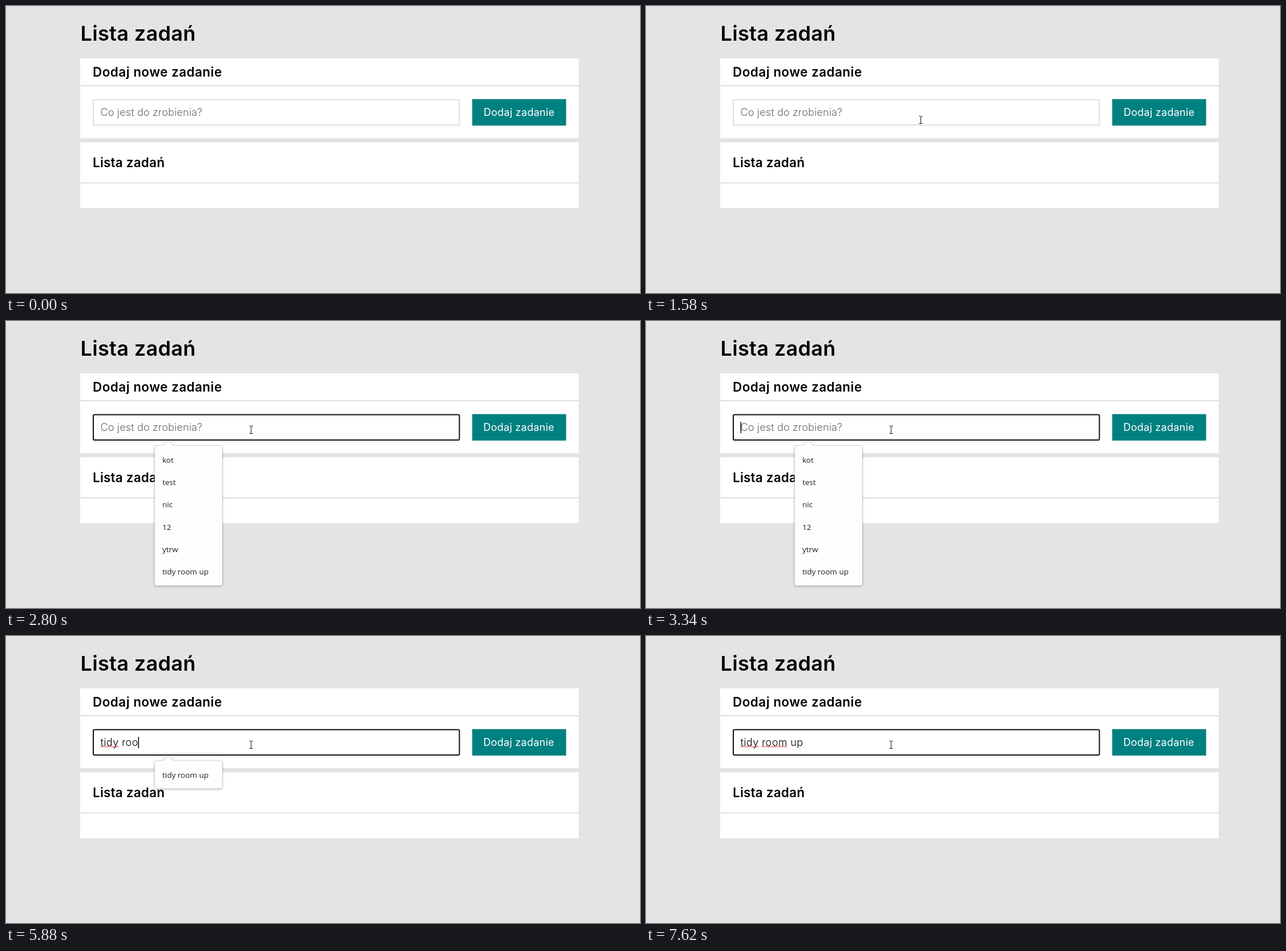
Write an HTML page with a canvas that moves like this. It is 1111 by 504 pixels and loops after 8 s.

```html
<!DOCTYPE html>
<html lang="pl">
<head>
<meta charset="utf-8">
<title>Lista zadań</title>
<style>
  html, body { margin: 0; width: 100%; height: 100%; overflow: hidden; background: #e3e5e4; }
  canvas { display: block; }
</style>
</head>
<body>
<canvas id="stage" width="1111" height="504"></canvas>
<script>
const ctx = document.getElementById('stage').getContext('2d');
const LOOP = 8000;
const SANS = 'Inter, "Open Sans", sans-serif';
const MENU_FONT = '13.5px "Open Sans", "Noto Sans", sans-serif';
const INPUT_FONT = `300 18px ${SANS}`;
const INPUT_SPACING = 0.4;
const FOCUS = 2340;
const TEXT_X = 165.5;

// [time, typed text]
const TYPING = [
  [3410, 't'], [3480, 'ti'], [3950, 'tid'], [4080, 'tidy'], [5090, 'tidy '],
  [5750, 'tidy ro'], [5880, 'tidy roo'], [6080, 'tidy room'],
  [6210, 'tidy room '], [6680, 'tidy room u'], [7080, 'tidy room up']
];
// [time, caret visible]
const CARET = [
  [0, false], [FOCUS, true], [2800, false], [3340, true], [4610, false],
  [5090, true], [5620, false], [5750, true], [7620, false]
];
const SUGGESTIONS = ['kot', 'test', 'nic', '12', 'ytrw', 'tidy room up'];

function latest(list, t, fallback) {
  let value = fallback;
  for (const [time, v] of list) if (t >= time) value = v;
  return value;
}

function box(x, y, w, h, color) {
  ctx.fillStyle = color;
  ctx.fillRect(x, y, w, h);
}

function label(str, x, y, font, color, spacing = 0) {
  ctx.font = font;
  ctx.letterSpacing = spacing + 'px';
  ctx.fillStyle = color;
  ctx.fillText(str, x, y);
}

function inputWidth(str) {
  ctx.font = INPUT_FONT;
  ctx.letterSpacing = INPUT_SPACING + 'px';
  return ctx.measureText(str).width;
}

function drawPage(t) {
  box(0, 0, 1111, 504, '#e3e5e4');
  label('Lista zadań', 130.5, 61, `600 36px ${SANS}`, '#000', 0.35);

  box(130, 92, 873.5, 140, '#fff');
  box(130, 139, 873.5, 2, '#dfdfdf');
  label('Dodaj nowe zadanie', 152, 123.5, `600 22.4px ${SANS}`, '#000', 0.5);

  box(130, 239.5, 873.5, 115.5, '#fff');
  box(130, 309.5, 873.5, 2, '#dfdfdf');
  label('Lista zadań', 152, 283, `600 22.4px ${SANS}`, '#000', 0.25);

  box(817, 163.5, 164.5, 46.5, '#008080');
  label('Dodaj zadanie', t < FOCUS ? 837 : 836.5, 192.5, `400 18px ${SANS}`, '#fff', 0.25);
}

function drawSquiggle(x, width) {
  ctx.beginPath();
  for (let i = 0; i <= width / 2; i++) ctx.lineTo(x + i * 2, i % 2 ? 193 : 195.5);
  ctx.strokeStyle = '#e8303a';
  ctx.lineWidth = 1;
  ctx.stroke();
}

function drawInput(t) {
  const focused = t >= FOCUS;
  ctx.beginPath();
  ctx.roundRect(153, 164.5, 641.5, 44.5, focused ? 2 : 0);
  ctx.strokeStyle = focused ? '#101010' : '#dfdfdf';
  ctx.lineWidth = 2;
  ctx.stroke();

  const typed = latest(TYPING, t, '');
  if (typed) label(typed, TEXT_X, 193, INPUT_FONT, '#000', INPUT_SPACING);
  else label('Co jest do zrobienia?', TEXT_X, 193, INPUT_FONT, '#666', 0.15);

  if (t >= 5160) drawSquiggle(TEXT_X, inputWidth('tidy'));
  if (t >= 6280) drawSquiggle(TEXT_X + inputWidth('tidy '), inputWidth('room'));
  if (latest(CARET, t, false)) {
    box(Math.round(TEXT_X + inputWidth(typed)) - 0.5, 177, 1.5, 20, '#000');
  }
}

function menuOpacity(t) {
  if (t < FOCUS) return 0;
  if (t < 2400) return 0.5;
  if (t < 7150) return 1;
  return t < 7220 ? 0.6 : t < 7290 ? 0.25 : 0;
}

function drawMenu(t) {
  const alpha = menuOpacity(t);
  if (!alpha) return;
  const typed = latest(TYPING, t, '');
  const items = SUGGESTIONS.filter(s => s.startsWith(typed));
  const left = 260.5, right = 379, top = 219, r = 4;
  const bottom = top + 49 + (items.length - 1) * 39.35;

  ctx.save();
  ctx.globalAlpha = alpha;
  ctx.beginPath();
  ctx.moveTo(left + r, top);
  ctx.lineTo(275.5, top);
  ctx.lineTo(284.5, 210.5);
  ctx.lineTo(293.5, top);
  ctx.arcTo(right, top, right, bottom, r);
  ctx.arcTo(right, bottom, left, bottom, r);
  ctx.arcTo(left, bottom, left, top, r);
  ctx.arcTo(left, top, right, top, r);
  ctx.closePath();
  ctx.shadowColor = 'rgba(0,0,0,.3)';
  ctx.shadowBlur = 4;
  ctx.shadowOffsetY = 1;
  ctx.fillStyle = '#fefefe';
  ctx.fill();
  ctx.shadowColor = 'transparent';
  ctx.strokeStyle = 'rgba(0,0,0,.12)';
  ctx.lineWidth = 0.8;
  ctx.stroke();
  items.forEach((s, i) => label(s, 274, 248.7 + i * 39.35, MENU_FONT, '#202020'));
  ctx.restore();
}

function drawArrow(x, y) {
  const shape = [[0, 0], [0, 14], [3.2, 11], [5.4, 16], [7.5, 15], [5.4, 10.2], [9.6, 10]];
  ctx.beginPath();
  for (const [dx, dy] of shape) ctx.lineTo(x + dx, y + dy);
  ctx.closePath();
  ctx.fillStyle = '#fff';
  ctx.fill();
  ctx.strokeStyle = '#111';
  ctx.lineWidth = 1;
  ctx.stroke();
}

function drawBeam(x, y) {
  box(x - 0.5, y - 6, 1, 13, '#111');
  for (const dy of [-7, 6]) {
    box(x - 3, y + dy, 2.5, 1, '#111');
    box(x + 0.5, y + dy, 2.5, 1, '#111');
  }
}

function drawPointer(t) {
  if (t < 970) return;
  if (t < 1380) {
    const k = Math.min(3, Math.floor((t - 970) / 70)) / 3;
    const eased = k * k * (3 - 2 * k);
    drawArrow(945.5 - 408.5 * eased, 443.5 - 232 * eased);
    return;
  }
  if (t >= 2200 && t < FOCUS) {
    ctx.beginPath();
    ctx.arc(427, 190, 13, 0, Math.PI * 2);
    ctx.fillStyle = '#ffff80';
    ctx.fill();
  }
  const k = Math.min(10, 1 + Math.floor((t - 1380) / 68.8)) / 10;
  const left = (1 - k) ** 2;
  drawBeam(Math.round(429 + 107 * left) + 0.5, Math.round(191 + 18 * left));
}

function frame() {
  const t = performance.now() % LOOP;
  drawPage(t);
  drawInput(t);
  drawMenu(t);
  drawPointer(t);
  requestAnimationFrame(frame);
}
frame();
</script>
</body>
</html>
```
